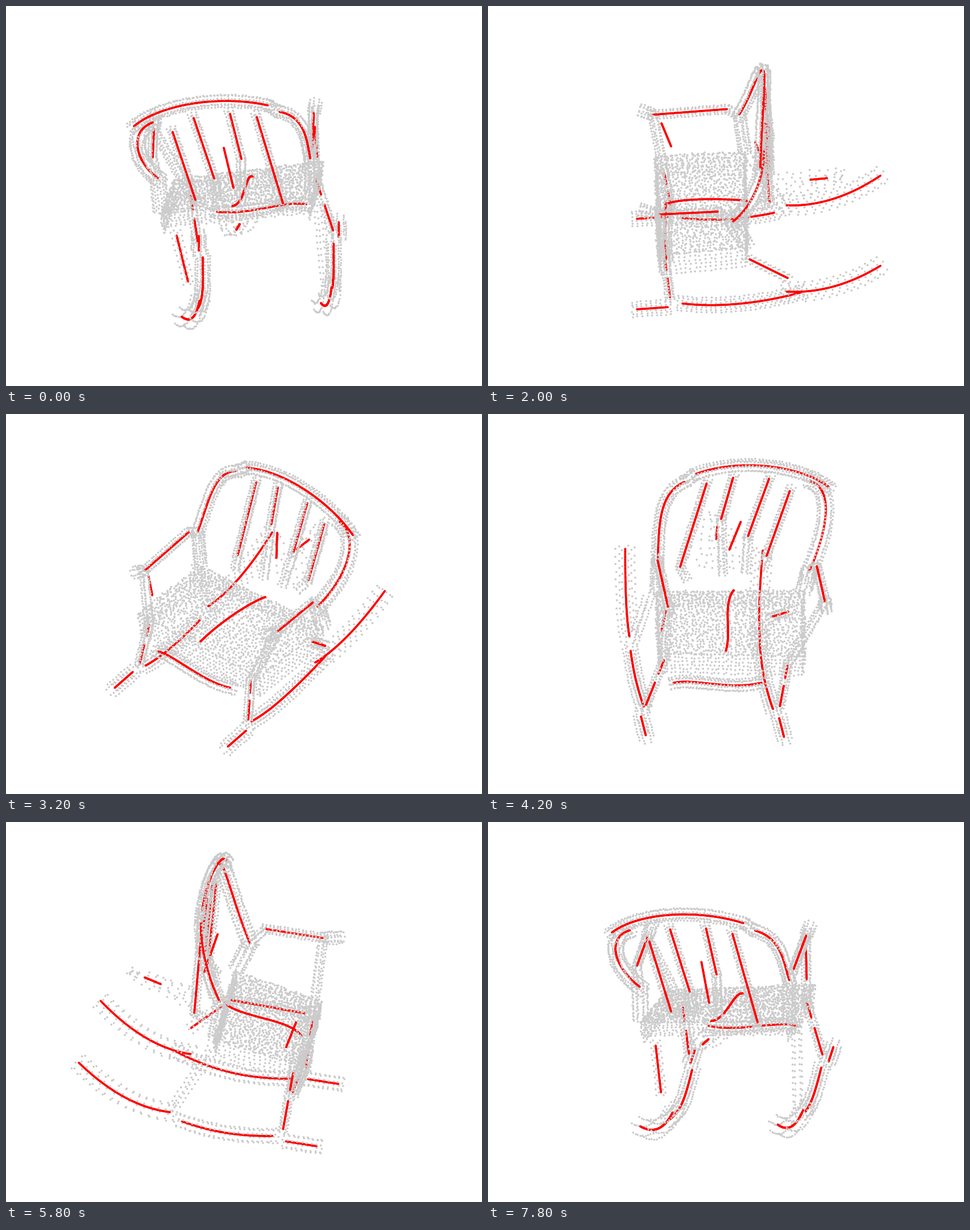
These frames come from a looping animation (837x669 px, 8000 ms). An HTML page with a canvas:

```html
<!DOCTYPE html>
<html lang="en">
<head>
<meta charset="utf-8">
<title>Rocking chair point cloud</title>
<style>
  html, body { margin: 0; width: 100%; height: 100%; overflow: hidden; background: #fff; }
  canvas { display: block; }
</style>
</head>
<body>
<canvas id="stage" width="837" height="669"></canvas>
<script>
const ctx = document.getElementById('stage').getContext('2d');
const CX = 418, TILT = 0.55, RISE = 0.835;   // axis x, sin and cos of the elevation
const STEPS = 40, STEP_MS = 200;
const GREY = '#cbcbcb', RED = '#ff0000';
const dots = [];   // [a, b, h, red]: a to the chair's right, b backwards, h down

// Tube looks: radius, gap between rings, dots per ring
const THIN = { r: 8, gap: 6.5, n: 5 };
const WIDE = { r: 11, gap: 6, n: 7 };
const HOOP = { r: 14, gap: 6.5, n: 8 };
const ROCKER = { r: 13, gap: 8.5, n: 6 };
const TAIL = { r: 17, gap: 14, n: 6 };
const SPARSE = { r: 9, gap: 11, n: 4 };

let seed = 7;
const rand = () => (seed = (seed * 16807) % 2147483647) / 2147483647;
const jitter = r => (rand() * 2 - 1) * r;
const mix = (p, q, t) => p.map((v, i) => v + (q[i] - v) * t);
const dist = (p, q) => Math.hypot(q[0] - p[0], q[1] - p[1], (q[2] - p[2]) / RISE);
const cross = (p, q) => [
  p[1] * q[2] - p[2] * q[1], p[2] * q[0] - p[0] * q[2], p[0] * q[1] - p[1] * q[0]];
const unit = p => { const l = Math.hypot(...p) || 1; return p.map(v => v / l); };

// Points of f(t) for t from 0 to 1
const sample = (f, n) => Array.from({ length: n + 1 }, (_, i) => f(i / n));

// Bezier curve of any degree, about one point per pixel
function bezier(...ctrl) {
  let len = 0;
  for (let i = 1; i < ctrl.length; i++) len += dist(ctrl[i - 1], ctrl[i]);
  return sample(t => {
    let p = ctrl;
    while (p.length > 1) p = p.slice(1).map((q, i) => mix(p[i], q, t));
    return p[0];
  }, Math.ceil(len));
}

// Rings of grey dots around a line
function tube(look, line) {
  let run = look.gap;
  for (let i = 1; i < line.length; i++) {
    const p = line[i - 1], q = line[i];
    run += dist(p, q);
    if (run < look.gap) continue;
    run -= look.gap;
    const dir = unit([q[0] - p[0], q[1] - p[1], (q[2] - p[2]) / RISE]);
    const u = unit(cross(dir, Math.abs(dir[0]) > 0.75 ? [0, 1, 0] : [1, 0, 0]));
    const v = cross(dir, u);
    for (let k = 0; k < look.n; k++) {
      const ang = (k + 0.25) / look.n * Math.PI * 2;
      const c = Math.cos(ang) * look.r, s = Math.sin(ang) * look.r;
      const at = d => u[d] * c + v[d] * s + jitter(0.9);
      dots.push([q[0] + at(0), q[1] + at(1), q[2] + at(2) * RISE, 0]);
    }
  }
}

const stroke = line => line.forEach(p => dots.push([...p, 1]));

// A red centre line inside a slightly longer grey tube
function rod(look, line) {
  const n = line.length, reach = 9;
  const head = sample(t => mix(line[0], line[1], (t - 1) * reach), reach);
  const tail = sample(t => mix(line[n - 1], line[n - 2], -t * reach), reach);
  stroke(line);
  tube(look, [...head, ...line, ...tail]);
}

// Bilinear sheet of dots between the edges p-q and r-s
function sheet(p, q, r, s, nu, nv, noise) {
  for (let i = 0; i <= nu; i++)
    for (let j = 0; j <= nv; j++) {
      const d = mix(mix(p, q, i / nu), mix(r, s, i / nu), j / nv);
      dots.push([d[0] + jitter(noise), d[1] + jitter(noise), d[2] + jitter(noise / 2), 0]);
    }
}

function slat(topA, endA, endH) {
  const top = [topA, 69, 152 + 3.7e-5 * Math.abs(topA + 30) ** 3];
  const end = [endA, 77, endH];
  rod(THIN, bezier(top, end));
  tube(THIN, bezier(end, [endA * 0.85, 55, Math.max(endH + 15, 315)]));
}

// Armrest, front leg, foot and rocker of one side
function side({ base, drift, out, drop, split, arm, legTop, legEnd, joint }) {
  const [front, rear] = arm;
  rod(THIN, bezier(front, rear));
  tube(WIDE, bezier(front, [front[0] + 4, -156, front[2] - 7]));
  tube(THIN, bezier(rear, joint));
  tube(THIN, bezier(front, legTop));

  const leg = t => mix(legTop, legEnd, t);
  rod(THIN, bezier(leg(0), leg(0.3)));
  rod(THIN, bezier(leg(0.5), leg(1)));

  const run = (from, to, shift, height) => sample(t => {
    const b = from + (to - from) * t;
    return [base + shift - drift * Math.max(0, b) ** 2, b, drop + height(b)];
  }, to - from);
  rod(ROCKER, run(-156, -102, out, b => 463 - 0.07 * (b + 106)));
  rod(ROCKER, run(-76, split, 0, b => 463 - 0.0011 * (b + 25) ** 2));
  rod(TAIL, run(107, 272, 0, b => 436 - 0.0023 * (b - 107) ** 2));
}

// Back
const hoopLeft = [-151, 13, 296], hoopRight = [117, 24, 255];
const railEnd = [42, 67, 138], bendStart = [63, 66, 150];
rod(WIDE, bezier([-193, 61, 178], [-145, 62, 138], [-40, 70, 118], railEnd));
rod(HOOP, bezier([-160, 67, 168], [-205, 68, 185], [-188, 48, 250], hoopLeft));
rod(WIDE, bezier(bendStart, [109, 60, 162], [111, 49, 212], hoopRight));
tube(WIDE, bezier(railEnd, bendStart));
slat(-125, -85, 299);
slat(-88, -52, 261);
slat(-24, -4, 227);
slat(23, 69, 305);
stroke(bezier([-35, 52, 221], [-18, 73, 280]));

// Seat with its skirt
const FL = [-122, -120, 372], FR = [140, -124, 342], RL = [-145, 38, 345], RR = [118, 34, 322];
const skirt = (p, q, depth, n) => {
  const low = ([a, b, h]) => [a * 0.97, b * 0.95, h + depth];
  sheet(p, q, low(p), low(q), n, 5, 1.8);
};
sheet(FL, FR, RL, RR, 38, 25, 3);
skirt(FL, FR, 36, 36);
skirt(FL, RL, 36, 17);
skirt(FR, RR, 36, 17);
skirt(RL, RR, 24, 34);
tube(HOOP, bezier(hoopLeft, RL));
tube(WIDE, bezier(hoopRight, RR));
stroke(bezier([17, -106, 359], [2, -85, 338], [5, 10, 342], [-20, 37, 332]));

side({
  base: -72, drift: 0.0005, out: -7, drop: 24, split: 132,
  arm: [[-158, -116, 280], [-160, -14, 274]], joint: hoopLeft,
  legTop: [-93, -107, 393], legEnd: [-81, -98, 468]
});
side({
  base: 158, drift: 0.0003, out: 9, drop: 0, split: 85,
  arm: [[123, -128, 259], [121, 2, 248]], joint: hoopRight,
  legTop: [127, -108, 364], legEnd: [157, -95, 447]
});
stroke(bezier([125, -113, 275], [129, -96, 318]));

// Stretcher, rear legs and the piece behind the back
rod(WIDE, bezier([-47, -105, 420], [10, -107, 428], [75, -107, 400], [110, -105, 407]));
rod(SPARSE, bezier([-118, 42, 381], [-98, 109, 425]));
tube(SPARSE, bezier([132, 35, 330], [146, 110, 445]));
stroke(bezier([-7, 149, 302], [-13, 178, 296]));
sheet([-45, 90, 325], [35, 90, 315], [-30, 205, 292], [0, 205, 288], 6, 8, 4);

function draw(step) {
  const turn = step / STEPS * Math.PI * 2, c = Math.cos(turn), s = Math.sin(turn);
  const view = dots.map(([a, b, h, red]) => {
    const near = b * c - a * s;
    return { x: CX + a * c + b * s, y: h + TILT * near, z: RISE * near - 0.66 * h + red * 7, red };
  }).sort((p, q) => p.z - q.z);
  ctx.fillStyle = '#fff';
  ctx.fillRect(0, 0, 837, 669);
  for (const p of view) {
    ctx.fillStyle = p.red ? RED : GREY;
    ctx.beginPath();
    ctx.arc(p.x, p.y, 1.85, 0, 7);
    ctx.fill();
  }
}

let shown = -1;
const start = performance.now();
function tick() {
  const step = Math.floor((performance.now() - start) / STEP_MS) % STEPS;
  if (step !== shown) draw(shown = step);
  requestAnimationFrame(tick);
}
tick();
</script>
</body>
</html>
```
